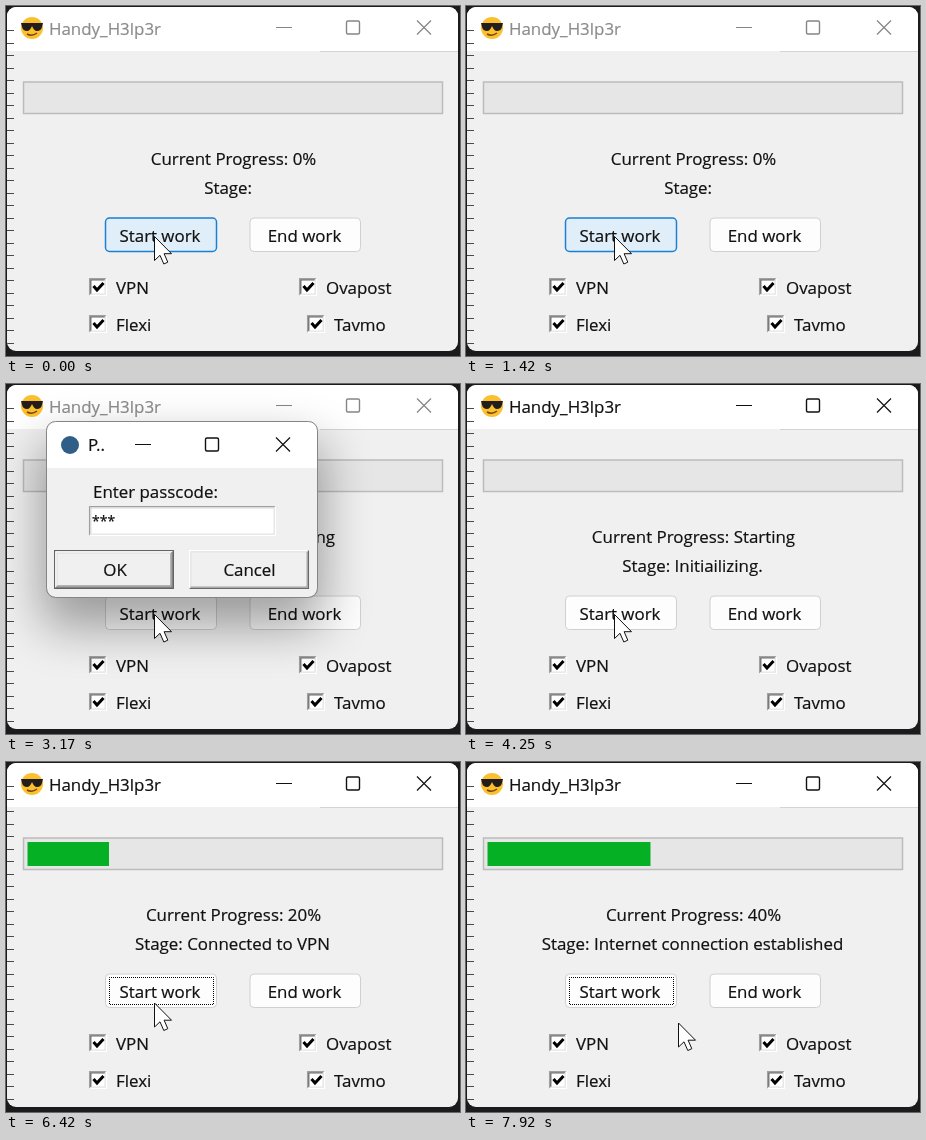
An HTML page that plays this animation: 454 px wide and 350 px high, repeating every 8000 ms.

```html
<!DOCTYPE html>
<html lang="en">
<head>
<meta charset="utf-8">
<title>Handy_H3lp3r</title>
<style>
html, body { margin: 0; width: 100%; height: 100%; overflow: hidden; background: #1b1b1d; }
svg { display: block; width: 100%; height: 100%; }
text { font: 16.9px "Open Sans", "Noto Sans", sans-serif; fill: currentColor; stroke: currentColor; stroke-width: .2; white-space: pre; }
.mid { text-anchor: middle; }
.line { fill: none; stroke: currentColor; }
</style>
</head>
<body>
<svg id="stage" viewBox="0 0 454 350" color="#111">
  <defs>
    <clipPath id="frame"><rect x="1" y="1" width="451" height="344" rx="9"/></clipPath>
    <clipPath id="box"><rect x="41" y="38" width="270" height="175" rx="9"/></clipPath>
    <filter id="blur" x="-50%" y="-70%" width="200%" height="240%"><feGaussianBlur stdDeviation="25"/></filter>
  </defs>

  <g clip-path="url(#frame)">
    <rect width="454" height="350" fill="#f0f0f0"/>
    <rect width="454" height="45" fill="#fff"/>
    <path d="M314 45.5H453" class="line" color="#d4d4d4"/>
    <path id="ticks" stroke="#4a4a4a" fill="none"/>

    <circle cx="26" cy="22" r="11" fill="#fbc02d"/>
    <path d="M15 17H37L36 21Q35 25 31 25Q28 25 26 20Q24 25 21 25Q17 25 16 21Z" fill="#231d1b"/>
    <path d="M21 28Q26 31 31 27" class="line" color="#7a4310" stroke-width="1.5"/>
    <text id="title" x="43" y="29">Handy_H3lp3r</text>
    <g id="controls"></g>

    <rect x="17.5" y="76" width="419" height="31.5" fill="#e6e6e6" stroke="#bcbcbc" stroke-width="1.5"/>
    <rect id="bar" x="21.5" y="80" height="24" fill="#06b025"/>

    <text id="progress" class="mid" x="227.5" y="159"></text>
    <text id="phase" class="mid" x="226.5" y="188"></text>

    <rect id="start" x="99.5" y="212" width="111" height="33.5" rx="4"/>
    <rect id="focus" x="103.5" y="215.5" width="104" height="27" class="line" color="#000" stroke-dasharray="1" stroke-dashoffset=".5"/>
    <text class="mid" x="154" y="236">Start work</text>
    <rect x="244" y="212" width="110.5" height="33.5" rx="4" fill="#fdfdfd" stroke="#d0d0d0"/>
    <text class="mid" x="298.5" y="236">End work</text>
    <g id="checks"></g>
  </g>

  <g id="dialog">
    <g clip-path="url(#frame)">
      <rect x="36" y="58" width="280" height="185" rx="12" opacity=".36" filter="url(#blur)"/>
    </g>
    <g clip-path="url(#box)">
      <rect x="41" y="38" width="270" height="175" fill="#f0f0f0"/>
      <rect x="41" y="38" width="270" height="46" fill="#fff"/>
    </g>
    <rect x="40.5" y="37.5" width="271" height="176" rx="9" class="line" color="#858585"/>
    <circle cx="64" cy="61" r="9" fill="#2f5f87"/>
    <text x="82" y="67">P..</text>
    <g id="dlgControls"></g>
    <text x="87" y="114">Enter passcode:</text>
    <g id="entry"></g>
    <text id="stars" x="86" y="141.5" style="font-size:14px"></text>
    <rect id="caret" x="85" y="125" width="3" height="25"/>
    <g id="dlgButtons"></g>
    <text class="mid" x="109" y="192">OK</text>
    <text class="mid" x="243.5" y="192">Cancel</text>
  </g>

  <path id="cursor" d="M0 0V24L5.5 18.8L9.3 27.5L13.3 25.7L9.6 17.2H17Z" fill="#fff" stroke="#111" stroke-linejoin="round"/>
</svg>
<script>
const LOOP = 8000;
const OPEN = 1750, CLOSE = 3750, STEP1 = 6330, STEP2 = 7330;
const $ = id => document.getElementById(id);
const set = (id, attrs) => {
  for (const k in attrs) $(id).setAttribute(k, attrs[k]);
};
const show = (id, on) => set(id, { display: on ? "inline" : "none" });
const label = (id, s) => { if ($(id).textContent !== s) $(id).textContent = s; };

const windowControls = (x, y) =>
  `<path class="line" stroke-width="1.2" d="M${x} ${y}h16M${x + 141} ${y - 7}l14 14m0 -14l-14 14"/>` +
  `<rect class="line" stroke-width="1.4" x="${x + 70.5}" y="${y - 6.5}" width="13" height="13" rx="1.5"/>`;

// Two-tone bevel: c1/c2 on the top left, c3/c4 on the bottom right
function bevel(x, y, w, h, fill, c1, c2, c3, c4) {
  const corner = (c, d, lower) => {
    const l = x + d, t = y + d, r = x + w - d, b = y + h - d;
    return `<path class="line" color="${c}" stroke-width="1.3" d="M${l} ${b}${lower ? `H${r}V${t}` : `V${t}H${r}`}"/>`;
  };
  return `<rect x="${x}" y="${y}" width="${w}" height="${h}" fill="${fill}"/>` +
    corner(c1, .6, false) + corner(c2, 1.8, false) +
    corner(c3, .6, true) + corner(c4, 1.8, true);
}
const sunken = (x, y, w, h, inner) => bevel(x, y, w, h, "#fff", "#a0a0a0", inner, "#fff", "#e3e3e3");
const raised = (x, y, w, h) => bevel(x, y, w, h, "#f0f0f0", "#fff", "#e3e3e3", "#696969", "#a0a0a0");

const check = (x, y, name) => sunken(x, y, 18, 18, "#696969") +
  `<path class="line" color="#000" stroke-width="3" d="M${x + 4.5} ${y + 8}l3.5 4l6.5 -7"/>` +
  `<text x="${x + 27}" y="${y + 16}">${name}</text>`;

let ticks = "";
for (let y = 24.5; y < 345; y += 12.5) ticks += `M1 ${Math.floor(y) + .5}h7`;
set("ticks", { d: ticks });
$("controls").innerHTML = windowControls(270, 21.5);
$("dlgControls").innerHTML = windowControls(129, 60.5);
$("checks").innerHTML = check(83, 272, "VPN") + check(83, 309, "Flexi") +
  check(293, 272, "Ovapost") + check(301, 309, "Tavmo");
$("entry").innerHTML = sunken(83, 122, 187, 30, "#d8d8d8");
$("dlgButtons").innerHTML = '<rect x="48" y="166" width="120" height="39" fill="#646464"/>' +
  raised(49.3, 167.3, 117.4, 36.4) + raised(183, 166, 120, 39);

const ease = (t, from, to) => {
  const p = Math.min(1, Math.max(0, (t - from) / (to - from)));
  return p * p * (3 - 2 * p);
};

function draw(t) {
  const open = t >= OPEN && t < CLOSE;
  const active = t >= CLOSE;
  const done = t < STEP1 ? 0 : t < STEP2 ? 1 : 2;

  set("title", { color: active ? "#111" : "#8c8c8c" });
  set("controls", { color: active ? "#111" : "#858585" });

  set("bar", { width: 81.5 * done });
  label("progress", "Current Progress: " + (t < OPEN ? "0%" : done ? done * 20 + "%" : "Starting"));
  label("phase", "Stage: " + (t < OPEN ? "\u00a0" :
    ["Initiailizing.", "Connected to VPN", "Internet connection established"][done]));

  const hover = t < OPEN;
  set("start", {
    fill: hover ? "#e0eef9" : "#fdfdfd",
    stroke: hover ? "#1a80d4" : "#d0d0d0",
    "stroke-width": hover ? 1.5 : 1
  });
  show("focus", done > 0);

  show("dialog", open);
  if (open) {
    const p = ease(t, OPEN, OPEN + 150), s = .92 + .08 * p;
    set("dialog", { opacity: .3 + .7 * p, transform: `translate(176 126) scale(${s}) translate(-176 -126)` });
    const typed = Math.min(3, Math.max(0, Math.floor((t - 2330) / 250)));
    label("stars", "*".repeat(typed));
    set("caret", { x: 85 + typed * 7.7 });
    show("caret", (t - 1670) % 900 < 600);
  }

  const drop = ease(t, 5950, 6300), away = ease(t, 7500, 7900);
  set("cursor", { transform: `translate(${148.5 + 64 * away} ${230.5 + 10.5 * drop + 20 * away})` });
}

function tick(now) {
  draw(now % LOOP);
  requestAnimationFrame(tick);
}
draw(0);
requestAnimationFrame(tick);
</script>
</body>
</html>
```
